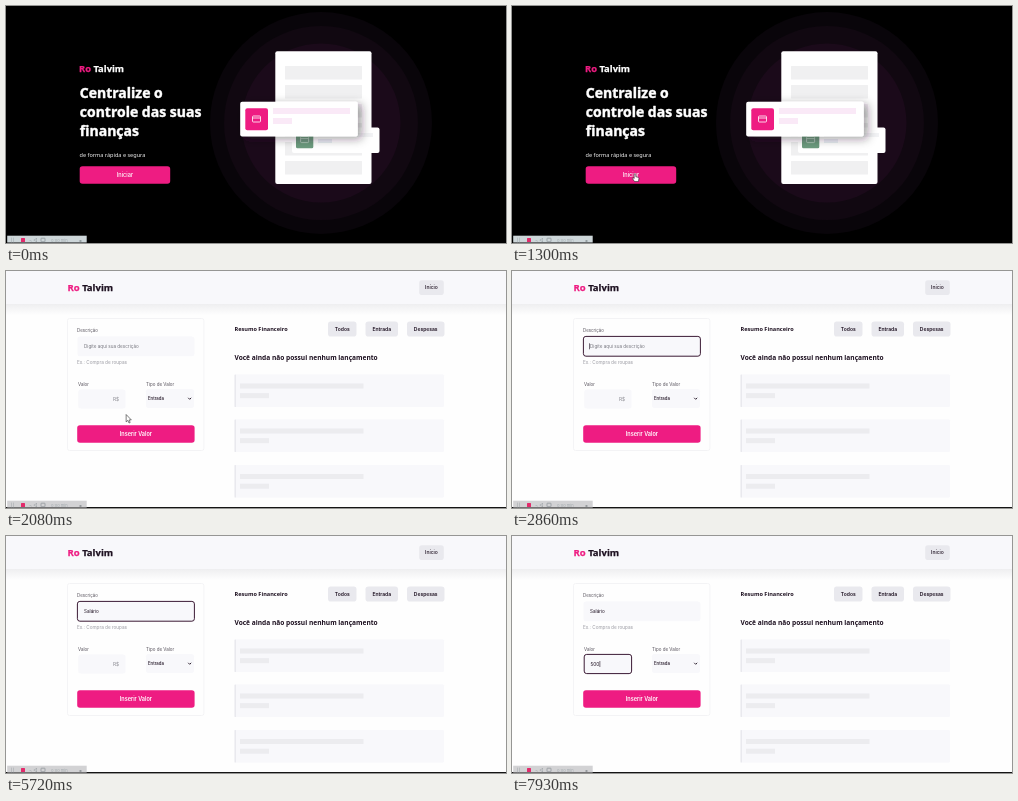
These frames come from a looping animation (500x237 px, 8000 ms). An HTML page:

```html
<!DOCTYPE html>
<html lang="pt-BR">
<head>
<meta charset="utf-8">
<title>Controle de finanças</title>
<style>
  html, body { margin: 0; width: 100%; height: 100%; overflow: hidden; background: #000; }
  svg { display: block; width: 100vw; height: 100vh; }
  text { white-space: pre; }
  .ui { font-family: Inter, sans-serif; }
  .head { font-family: "Noto Sans", sans-serif; font-weight: 700; }
  .black { font-family: "Noto Sans", sans-serif; font-weight: 900; stroke-linejoin: round; }
  .body { font-family: "Noto Sans", sans-serif; }
  .raw { font-family: "Liberation Serif", serif; }
</style>
</head>
<body>
<svg id="stage" viewBox="0 0 500 237" preserveAspectRatio="none">
  <defs>
    <linearGradient id="fade" x1="0" y1="0" x2="0" y2="1">
      <stop offset="0" stop-color="#eeeef0"/>
      <stop offset="1" stop-color="#fefefe"/>
    </linearGradient>
    <filter id="shadow" x="-20%" y="-60%" width="140%" height="220%">
      <feDropShadow dx="4" dy="2.5" stdDeviation="5" flood-color="#201525" flood-opacity=".42"/>
    </filter>
  </defs>
</svg>
<script>
const LOOP = 8000, STEP = 130;
const PINK = '#ee1c82', INK = '#1d1020', SOFT = '#f8f8fb', GREY = '#e9e9ee';
const stage = document.getElementById('stage');

function add(parent, tag, attrs, content) {
  const node = document.createElementNS('http://www.w3.org/2000/svg', tag);
  for (const key in attrs) node.setAttribute(key, attrs[key]);
  if (content) node.textContent = content;
  parent.appendChild(node);
  return node;
}
const group = (parent, attrs = {}) => add(parent, 'g', attrs);
const box = (parent, x, y, width, height, fill, rx = 0, extra = {}) =>
  add(parent, 'rect', { x, y, width, height, fill, rx, ...extra });
const label = (parent, x, y, size, fill, cls, content, extra = {}) =>
  add(parent, 'text', { x, y, 'font-size': size, fill, class: cls, ...extra }, content);
const show = (node, on) => node.setAttribute('visibility', on ? 'inherit' : 'hidden');
const middle = { 'text-anchor': 'middle' };
const heavy = (color, width) => ({ stroke: color, 'stroke-width': width });

function logo(parent, x, y, size, color) {
  const node = label(parent, x, y, size, color, 'black', '');
  add(node, 'tspan', { fill: PINK, ...heavy(PINK, .25) }, 'Ro');
  add(node, 'tspan', heavy(color, .25), ' Talvim');
}

function button(parent, x, y, w, h, fill, color, size, content, weight) {
  box(parent, x, y, w, h, fill, 2.8);
  label(parent, x + w / 2, y + h / 2 + size * .36, size, color, 'ui', content,
    { ...middle, 'font-weight': weight });
}

function cardIcon(parent, x, y, color) {
  const icon = group(parent, { fill: 'none', stroke: color, 'stroke-width': .8 });
  box(icon, x, y, 8, 6, 'none', .9);
  add(icon, 'path', { d: `M${x} ${y + 2}h8` });
}

// Landing page
const landing = group(stage);
box(landing, 0, 0, 500, 237, '#000');
[[111, '#09050a'], [97, '#110811'], [79.5, '#1b0a1a']].forEach(([r, fill]) =>
  add(landing, 'circle', { cx: 315, cy: 117, r, fill }));
box(landing, 269.3, 45.2, 96.2, 132.8, '#fff', 2);
[60, 79, 98, 117, 136, 155].forEach(y => box(landing, 279, y, 77, 13.5, '#f0f0f1', .5));
box(landing, 286, 121.5, 87.5, 25.5, '#fff', 2);
box(landing, 290, 125, 17.3, 17.3, '#6b9a7d', 1.5);
cardIcon(landing, 294.6, 130.6, '#b9d0c2');
box(landing, 312, 127, 55, 4, '#f2f3f5');
box(landing, 312, 133, 14, 4, '#e9f0f4');
box(landing, 234.2, 95.7, 117.6, 34.8, '#fff', 2, { filter: 'url(#shadow)' });
box(landing, 239.3, 102.2, 22.7, 22, PINK, 2);
cardIcon(landing, 246.5, 110, '#fff');
box(landing, 267, 102, 77, 6, '#fae9f7');
box(landing, 267, 112, 19, 6, '#fae9f7');
logo(landing, 73, 65.5, 9.4, '#fff');
['Centralize o', 'controle das suas', 'finanças'].forEach((line, i) =>
  label(landing, 73.8, 91.8 + i * 19.2, 14, '#fff', 'black', line, heavy('#fff', .45)));
label(landing, 73.5, 150.6, 5.55, '#f2f2f2', 'body', 'de forma rápida e segura');
button(landing, 73.7, 160.2, 90.5, 17.6, PINK, '#fff', 5.6, 'Iniciar', 500);

// Dashboard
const board = group(stage);
box(board, 0, 0, 500, 237, '#fefefe');
box(board, 0, 33, 500, 11, 'url(#fade)');
box(board, 0, 0, 500, 33, SOFT);
button(board, 413.2, 9.2, 24.6, 14.8, GREY, INK, 5, 'Início', 500);
box(board, 61.5, 47.5, 136.3, 132, '#fefefe', 2, { stroke: '#f1f1f4', 'stroke-width': .8 });
const descBox = box(board, 71.4, 65.4, 117, 19.8, SOFT, 2.5);
const valueBox = box(board, 72.2, 118.4, 47.4, 19.2, SOFT, 2.5);
box(board, 140, 118, 48, 19, SOFT, 2.5);
const labels = [
  label(board, 71, 60.6, 4.35, '#55505a', 'ui', 'Descrição'),
  label(board, 71, 93.3, 4.65, '#9a9aa2', 'ui', 'Ex.: Compra de roupas'),
  label(board, 72, 114.6, 4.5, '#55505a', 'ui', 'Valor'),
  label(board, 140, 114.6, 4.5, '#55505a', 'ui', 'Tipo de Valor')
];
const desc = label(board, 78, 77, 4.6, INK, 'ui', '');
const value = label(board, 78.5, 129.8, 4.8, INK, 'ui', '');
const currency = label(board, 107, 129.6, 4.8, '#85858c', 'ui', 'R$');
label(board, 142, 129.3, 4.3, INK, 'ui', 'Entrada', { 'font-weight': 500 });
add(board, 'path', { d: 'M182.2 126.8l1.5 1.5 1.5-1.5', fill: 'none', stroke: INK, 'stroke-width': .9 });
button(board, 71.2, 154.2, 117.4, 17.6, PINK, '#fff', 5.5, 'Inserir Valor', 600);
label(board, 228.5, 60.4, 5.6, INK, 'head', 'Resumo Financeiro');
button(board, 322, 50.5, 28.5, 15, GREY, INK, 5, 'Todos', 600);
button(board, 359.5, 50.5, 32.5, 15, GREY, INK, 5, 'Entrada', 600);
button(board, 401, 50.5, 37.5, 15, GREY, INK, 5, 'Despesas', 600);
label(board, 228.5, 88.8, 6.6, INK, 'head', 'Você ainda não possui nenhum lançamento');

// Parts that load a moment later
const late = group(board);
logo(late, 61.5, 19.8, 9.5, INK);
[103.5, 148.5, 194].forEach(y => {
  box(late, 228.5, y, 209.5, 32.5, SOFT, 1);
  box(late, 228.5, y, 1.5, 32.5, GREY, .5);
  box(late, 234, y + 9, 123.5, 5, '#ececef');
  box(late, 234, y + 18.7, 29, 5, '#ececef');
});
const caret = box(board, 0, 0, .6, 6, INK);
box(board, 0, 236, 500, 1, '#151515');

// Recorder strip in the corner
const strip = group(stage);
const stripBack = box(strip, 1.2, 229.7, 79.5, 6.8, '#cdd6d9');
box(strip, 15, 232, 4, 4, '#e32a6b', .5);
label(strip, 5, 235.8, 4.5, '#8b9398', 'ui', '||');
label(strip, 23, 235.8, 4.5, '#8b9398', 'ui', '¬ ◁');
box(strip, 35, 232.2, 4, 3.5, 'none', .5, { stroke: '#7d858a', 'stroke-width': .6 });
label(strip, 45, 235.6, 4, '#a0a8ac', 'ui', '0:00 min');
label(strip, 73, 235.8, 4.5, '#50585c', 'ui', '×');

// Pointers, drawn with the hot spot at 0,0
const pen = { fill: '#fff', stroke: '#222', 'stroke-width': .5, 'stroke-linejoin': 'round' };
const pointer = group(stage);
const shapes = {
  arrow: 'M0 0v6.4l1.5-1.3 1 2.3 1-.5-1-2.2h2z',
  hand: 'M-.7 .6q.7-1 1.4 0v2.2l2 .5q.8.3.7 1.1l-.4 2.6h-3.4l-2-2.9q.2-1 1.7.2z',
  beam: 'M-1-3h2M0-3v6M-1 3h2'
};
const shapeNodes = {};
for (const name in shapes) shapeNodes[name] = add(pointer, 'path', { d: shapes[name], ...pen });

const moves = [
  [0, 75, 233], [130, 75, 233], [910, 123, 167.5], [1820, 123, 167.5],
  [2600, 112, 75], [LOOP, 112, 75]
];
// time, description, value, focused field, caret on
const steps = [
  [0, '', '', '', 0], [2600, '', '', 'desc', 1], [3120, '', '', 'desc', 0],
  [3640, '', '', 'desc', 1], [3900, 'Sa', '', 'desc', 1], [4030, 'Sal', '', 'desc', 1],
  [4550, 'Sal', '', 'desc', 0], [4680, 'Salá', '', 'desc', 1], [4810, 'Salár', '', 'desc', 1],
  [4940, 'Salári', '', 'desc', 1], [5070, 'Salário', '', 'desc', 1],
  [5720, 'Salário', '', 'desc', 0], [5980, 'Salário', '', 'value', 1],
  [6370, 'Salário', '5', 'value', 1], [6500, 'Salário', '50', 'value', 1],
  [7020, 'Salário', '50', 'value', 0], [7280, 'Salário', '500', 'value', 1],
  [7670, 'Salário', '500', 'value', 0], [7930, 'Salário', '500', 'value', 1]
];

function pointerAt(t) {
  const i = Math.max(1, moves.findIndex(m => m[0] > t));
  const [t0, x0, y0] = moves[i - 1], [t1, x1, y1] = moves[i];
  const p = (t - t0) / (t1 - t0), e = p * p * (3 - 2 * p);
  return [x0 + (x1 - x0) * e, y0 + (y1 - y0) * e];
}

function outline(node, on) {
  node.setAttribute('stroke', on ? '#3b1a34' : 'none');
  node.setAttribute('stroke-width', 1);
}

function draw(t) {
  const inside = t >= 1430, loaded = t >= 1560;
  show(landing, !inside);
  show(board, inside);
  show(late, loaded);
  stripBack.setAttribute('fill', inside ? '#d2d2d4' : '#cdd6d9');
  labels.forEach(node => node.setAttribute('class', loaded ? 'ui' : 'raw'));

  const [, text, amount, focus, blink] = steps.filter(s => s[0] <= t).pop();
  desc.textContent = text || 'Digite aqui sua descrição';
  desc.setAttribute('fill', text ? INK : '#77777f');
  value.textContent = amount;
  show(currency, !amount);
  outline(descBox, focus === 'desc');
  outline(valueBox, focus === 'value');
  show(caret, blink);
  if (blink && focus) {
    const field = focus === 'desc' ? desc : value;
    const filled = focus === 'desc' ? text : amount;
    const start = +field.getAttribute('x');
    caret.setAttribute('x', start + (filled ? field.getComputedTextLength() + .2 : -.6));
    caret.setAttribute('y', focus === 'desc' ? 72.3 : 125);
  }

  const [x, y] = pointerAt(Math.floor(t / STEP) * STEP);
  const onButton = inside ? y > 154 : y < 178;
  const kind = onButton ? 'hand' : inside && y < 86 ? 'beam' : 'arrow';
  for (const name in shapeNodes) show(shapeNodes[name], name === kind);
  show(pointer, t >= STEP && t < 2600);
  pointer.setAttribute('transform', `translate(${x} ${y}) scale(1.15)`);
}

const begin = performance.now();
function tick() {
  draw((performance.now() - begin) % LOOP);
  requestAnimationFrame(tick);
}
tick();
</script>
</body>
</html>
```
